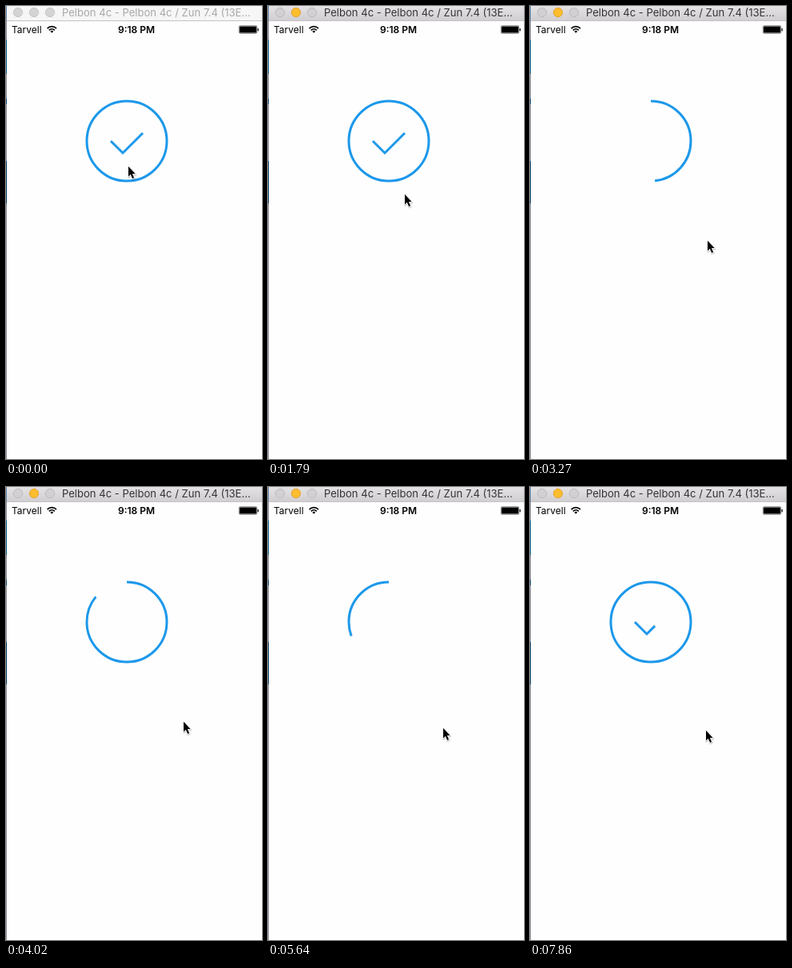
An HTML page for the animation above (8000 ms loop, 320 by 567 pixels).

```html
<!DOCTYPE html>
<html lang="en">
<head>
<meta charset="utf-8">
<title>Loading ring</title>
<style>
html, body { margin: 0; width: 100%; height: 100%; overflow: hidden; background: #fefefe; }
svg { display: block; width: 320px; height: 567px; }
text { font-family: Inter, Roboto, sans-serif; }
.line { fill: none; stroke: #1c98ea; stroke-width: 3; }
#bar { fill: #f6f6f6; }
#title { fill: #a8a8a8; font-size: 13.05px; }
.dot { fill: #d3d3d3; stroke: #c6c6c6; }
.active #bar { fill: url(#chrome); }
.active #title { fill: #343434; }
.active .dot { fill: #d3d0d3; stroke: #bdbabd; }
.active .dot.mid { fill: #fdbd2e; stroke: #e3a42c; }
</style>
</head>
<body>
<svg id="stage" viewBox="0 0 320 567">
  <defs>
    <linearGradient id="chrome" x1="0" y1="0" x2="0" y2="1">
      <stop offset="0" stop-color="#e5e2e5"/>
      <stop offset="1" stop-color="#d1ced1"/>
    </linearGradient>
    <path id="arrow" d="M1 1.7V14.4l2.8-2.7 2.3 5.2 2-.9-2.2-5h3.8z" stroke-linejoin="round"/>
  </defs>
  <rect width="320" height="567" fill="#fefefe"/>

  <rect width="1" height="567" fill="#8b8c98"/>
  <rect width="1" height="18" fill="#5b86ae"/>
  <rect y="42" width="1" height="43" fill="#0b6288"/>
  <rect y="116" width="1" height="7" fill="#0b4a78"/>
  <rect y="194" width="1" height="53" fill="#043d63"/>

  <rect id="bar" x="1" width="319" height="18"/>
  <rect x="1" y="18" width="319" height="1" fill="#c4c2c4"/>
  <circle class="dot" cx="15" cy="8" r="5.6"/>
  <circle class="dot mid" cx="35" cy="8" r="5.6"/>
  <circle class="dot" cx="55" cy="8" r="5.6"/>
  <text id="title" x="70" y="13">Pelbon 4c - Pelbon 4c / Zun 7.4 (13E...</text>

  <text x="7" y="33.5" font-size="12">Tarvell</text>
  <text x="163" y="33.5" font-size="12" font-weight="600" text-anchor="middle">9:18 PM</text>
  <g fill="none" stroke="#000" stroke-width="1.7">
    <path d="M51.6 28.1a8 8 0 0 1 11.4 0M53.8 30.4a5 5 0 0 1 7 0"/>
    <path d="M57.3 33.8l-1.9-2a2.7 2.7 0 0 1 3.8 0z" fill="#000" stroke="none"/>
  </g>
  <rect x="291.25" y="24.75" width="22.5" height="9.5" rx="1.5" fill="none" stroke="#000" stroke-width=".5"/>
  <rect x="292" y="25.5" width="21" height="8" rx=".8" fill="#000"/>
  <rect x="314.4" y="28" width="1.3" height="3.4" rx=".6" fill="#000"/>

  <path id="ring" class="line" pathLength="360" d="M151 119a50 50 0 0 1 0 100a50 50 0 0 1 0-100z"/>
  <path id="check" class="line" pathLength="100" d="M131 169l15 15l25-25"/>

  <g id="cursor">
    <use href="#arrow" x=".4" y="1" stroke="#000" stroke-width="2.4" opacity=".2"/>
    <use href="#arrow" stroke="#fff" stroke-width="1.8"/>
    <use href="#arrow"/>
  </g>
</svg>
<script>
const LOOP = 8000, STEP = 148;
const START = 2390;
const bursts = [START, 3570, 4760, 5930, 7120];

// rows of [time, value, ...]
const ringEnd = [[2338, 0], [3278, 174], [4290, 360]];
const ringStart = [[4290, 0], [4606, 42.5], [4908, 115], [6226, 354.5], [6250, 360]];
const ringAgain = [[6250, 0], [6625, 360]];
const tick = [[6625, 0], [6966, 17.5], [7860, 62.8]];
const pointer = [
  [1640, 152, 199], [1790, 170, 234], [1940, 187, 268], [START, 187, 268],
  [3278, 221, 292], [4908, 221, 293], [5796, 217, 301], [6226, 217, 302], [6966, 219, 303]
];

const $ = id => document.getElementById(id);
const stage = $("stage"), ring = $("ring"), check = $("check"), cursor = $("cursor");

function at(rows, t) {
  const i = rows.findIndex(r => r[0] > t);
  if (i === 0) return rows[0].slice(1);
  if (i < 0) return rows[rows.length - 1].slice(1);
  const a = rows[i - 1], b = rows[i];
  const k = (t - a[0]) / (b[0] - a[0]);
  return a.slice(1).map((v, n) => v + (b[n + 1] - v) * k);
}

// The screen refreshes only at these moments.
function snap(t) {
  if (t < START) return t < 1790 ? 0 : t < 1940 ? 1790 : 1940;
  const from = bursts.filter(b => b <= t).pop();
  return from + STEP * Math.min(7, Math.floor((t - from + 8) / STEP));
}

function show(path, from, to) {
  path.style.visibility = to - from > 0.01 ? "visible" : "hidden";
  path.setAttribute("stroke-dasharray", `0 ${from} ${to - from} 400`);
}

function draw(time) {
  const t = snap(time);
  const [x, y] = at(pointer, t);
  stage.classList.toggle("active", time >= 300);
  cursor.setAttribute("transform", `translate(${Math.round(x)} ${Math.round(y)})`);
  if (t < START) {
    show(ring, 0, 360);
    show(check, 0, 100);
  } else {
    if (t < 6250) show(ring, at(ringStart, t)[0], at(ringEnd, t)[0]);
    else show(ring, 0, at(ringAgain, t)[0]);
    show(check, 0, at(tick, t)[0]);
  }
}

const began = performance.now();
function frame() {
  draw((performance.now() - began) % LOOP);
  requestAnimationFrame(frame);
}
frame();
</script>
</body>
</html>
```
